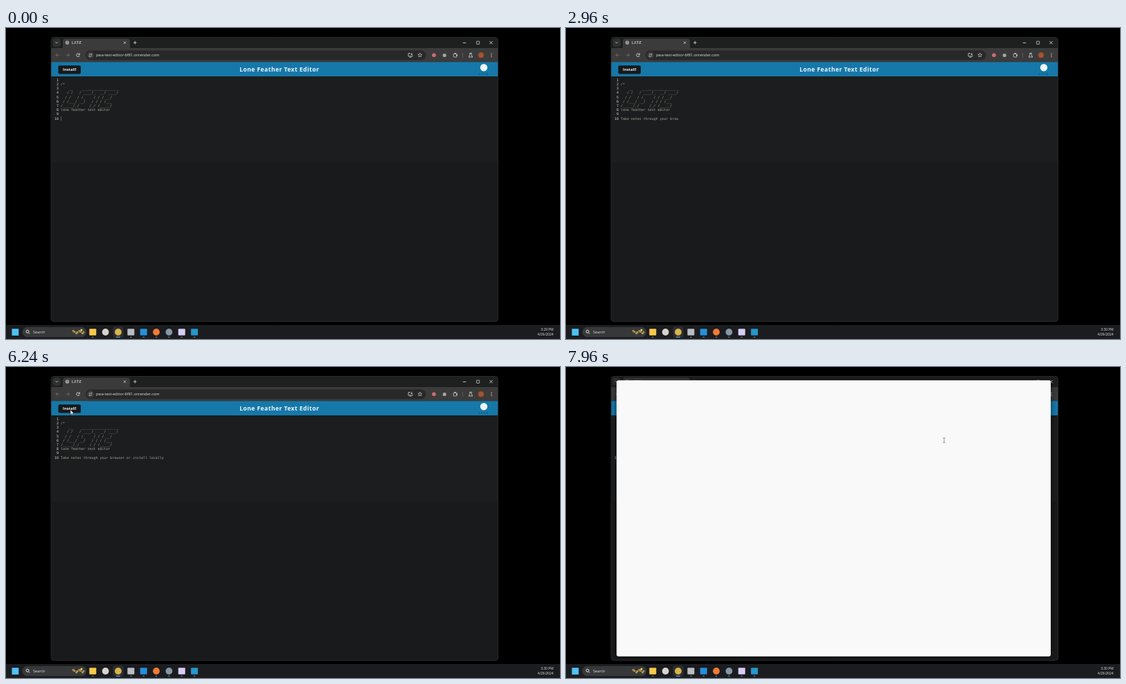
An HTML page with a canvas that plays this animation: 800 px wide and 450 px high, repeating every 8000 ms.

```html
<!DOCTYPE html>
<html lang="en">
<head>
<meta charset="utf-8">
<title>Lone Feather Text Editor</title>
<style>
html, body { margin: 0; width: 100%; height: 100%; overflow: hidden; background: #000; }
canvas { display: block; width: 800px; height: 450px; }
</style>
</head>
<body>
<canvas id="stage"></canvas>
<script>
const LOOP = 8000;
const UI = '"Open Sans", "Noto Sans", sans-serif';
const MONO = '"DejaVu Sans Mono", monospace';
const ROW = 6.22, COL = 2.98, CODE_X = 79, CODE_Y = 75;
const NOTE = 'Take notes through your browser or install locally';
const CODE = [
  '', '/*',
  '    __    __________________',
  '   / /   / ____/_  __/ ____/',
  '  / /   / /_    / / / __/',
  ' / /___/ __/   / / / /___',
  '/_____/_/     /_/ /_____/',
  'lone feather text editor', ''
];
const URL_TEXT = 'pwa-text-editor-6f81.onrender.com';
const POPUP = [6280, 7460], ICON_GONE = 7580, CLOCK_FLIP = 700, APP_OPEN = 7890;

const canvas = document.getElementById('stage');
const ctx = canvas.getContext('2d');
const dpr = window.devicePixelRatio || 1;
canvas.width = 800 * dpr;
canvas.height = 450 * dpr;

const clamp = v => Math.max(0, Math.min(1, v));
const ease = v => v * v * (3 - 2 * v);

function box(x, y, w, h, fill, r = 0, stroke) {
  ctx.beginPath();
  ctx.roundRect(x, y, w, h, r);
  if (fill) { ctx.fillStyle = fill; ctx.fill(); }
  if (stroke) { ctx.strokeStyle = stroke; ctx.lineWidth = 0.7; ctx.stroke(); }
}

function dot(x, y, r, fill, stroke, lw = 0.8) {
  ctx.beginPath();
  ctx.arc(x, y, r, 0, 7);
  if (fill) { ctx.fillStyle = fill; ctx.fill(); }
  if (stroke) { ctx.strokeStyle = stroke; ctx.lineWidth = lw; ctx.stroke(); }
}

function line(color, lw, ...p) {
  ctx.beginPath();
  ctx.moveTo(p[0], p[1]);
  for (let i = 2; i < p.length; i += 2) ctx.lineTo(p[i], p[i + 1]);
  ctx.strokeStyle = color;
  ctx.lineWidth = lw;
  ctx.stroke();
}

function text(s, x, y, size, color, { font = UI, weight = 400, align = 'left', gap = 0 } = {}) {
  ctx.font = `${weight} ${size}px ${font}`;
  ctx.letterSpacing = gap + 'px';
  ctx.textAlign = align;
  ctx.fillStyle = color;
  ctx.fillText(s, x, y + size * 0.35);
}

function cross(x, y, r, color) {
  line(color, 0.8, x - r, y - r, x + r, y + r);
  line(color, 0.8, x - r, y + r, x + r, y - r);
}

function tabStrip() {
  box(65, 13.5, 645.5, 411, '#191a1b', 4, '#363636');
  box(65.4, 14, 644.8, 20, '#1e1f1f', [4, 4, 0, 0]);
  box(67.5, 15.5, 11.5, 11.5, '#303131', 4);
  line('#dddddd', 0.8, 71.5, 20.3, 73.2, 22, 74.9, 20.3);
  box(82, 15.5, 97, 14, '#3b3b3b', [4, 4, 0, 0]);
  dot(88.5, 21.2, 2.4, '#777', '#c8c8c8', 0.7);
  line('#d0d0d0', 0.6, 86.8, 20.2, 88.8, 21.3, 88, 23);
  text('L.F.T.E', 95, 21.2, 4.9, '#eeeeee', { weight: 600 });
  cross(171.5, 21.2, 1.6, '#e0e0e0');
  line('#e0e0e0', 0.8, 184, 21.2, 188.6, 21.2);
  line('#e0e0e0', 0.8, 186.3, 18.9, 186.3, 23.5);
  line('#e8e8e8', 0.8, 659.8, 21.5, 664.2, 21.5);
  box(679.5, 19.2, 4.2, 4.2, null, 0.6, '#e8e8e8');
  cross(700.5, 21.2, 2.1, '#e8e8e8');
}

function arrow(x, y, dir, color) {
  line(color, 0.8, x - 2.5, y, x + 2.5, y);
  line(color, 0.8, x + dir * 0.3, y - 2.2, x + dir * 2.5, y, x + dir * 0.3, y + 2.2);
}

function star(x, y, r, color) {
  ctx.beginPath();
  for (let i = 0; i < 10; i++) {
    const a = i * Math.PI / 5 - Math.PI / 2, d = i % 2 ? r * 0.48 : r;
    ctx.lineTo(x + d * Math.cos(a), y + d * Math.sin(a));
  }
  ctx.closePath();
  ctx.strokeStyle = color;
  ctx.lineWidth = 0.7;
  ctx.stroke();
}

function toolBar(t) {
  const ink = '#d8d8d8';
  box(65.4, 29, 644.8, 20.5, '#3b3b3b');
  arrow(74.5, 39.2, -1, '#777777');
  arrow(89, 39.2, 1, '#777777');
  ctx.beginPath();
  ctx.arc(104, 39.2, 2.3, 0.3, 5.5);
  ctx.strokeStyle = ink;
  ctx.lineWidth = 0.9;
  ctx.stroke();
  line(ink, 0.9, 106.4, 36.6, 106.4, 38.6, 104.4, 38.6);

  box(115, 32.4, 491.5, 13.8, '#282828', 6.9);
  dot(122, 39.3, 5, '#3b3b3b');
  line(ink, 0.7, 119.8, 38, 122.2, 38);
  dot(123.4, 38, 0.8, null, ink, 0.6);
  line(ink, 0.7, 121.8, 40.8, 124.2, 40.8);
  dot(120.6, 40.8, 0.8, null, ink, 0.6);
  text(URL_TEXT, 130, 39.2, 5.58, '#e3e3e3');

  if (t < ICON_GONE) {
    if (t >= POPUP[0] && t < POPUP[1]) dot(584, 39.3, 5, '#5b5c5e');
    line(ink, 0.8, 584, 36.8, 581, 36.8, 581, 41, 587, 41, 587, 39.6);
    line(ink, 0.8, 582.6, 42.2, 585.4, 42.2);
    line(ink, 0.8, 585.8, 35.8, 585.8, 39);
    line(ink, 0.8, 584.5, 37.8, 585.8, 39.1, 587.1, 37.8);
  }
  star(597.7, 39.3, 3, ink);
  dot(618, 39.3, 2.8, '#c96f6a');
  dot(633.2, 39.5, 2.6, '#a5a5a5');
  box(646.2, 37.2, 4.8, 4.8, null, 0.7, ink);
  dot(648.5, 37, 1, ink);
  dot(651, 39.5, 1, ink);
  line('#666666', 0.7, 659.5, 36, 659.5, 42.5);
  line(ink, 0.8, 670, 36.3, 670, 38.6, 668.3, 42, 673.7, 42, 672, 38.6, 672, 36.3);
  line(ink, 0.8, 669.3, 36.4, 672.7, 36.4);
  dot(686, 39.3, 4, '#a5532d');
  for (let i = -1; i < 2; i++) dot(701, 39.3 + i * 2.1, 0.65, '#e3e3e3');
}

function page(t) {
  box(65.4, 49.3, 644.8, 20.7, '#1678a9');
  box(75.5, 54.3, 32.5, 12.2, '#15191c', 2);
  text('Install!', 91.8, 60.4, 5.7, '#f4f4f4', { weight: 700, align: 'center' });
  text('Lone Feather Text Editor', 394.7, 60, 8.6, '#f0f6fa',
    { weight: 700, align: 'center', gap: 0.43 });
  dot(690, 57.3, 5.2, '#eef5f9');
  text('LFTE', 690, 66.8, 4.2, '#0d4564', { align: 'center', gap: 1.4 });
  box(65.4, 70, 644.8, 125, '#1c1d1e');

  const opt = { font: MONO };
  for (let i = 0; i < 10; i++) {
    const y = CODE_Y + i * ROW;
    text(String(i + 1), 76, y, 4.95, '#dededa', { font: MONO, align: 'right' });
    if (CODE[i]) text(CODE[i], CODE_X, y, 4.95, '#aaa597', opt);
  }
  const n = typed(t), y = CODE_Y + 9 * ROW;
  text(NOTE.slice(0, n), CODE_X, y, 4.95, '#aaa597', opt);
  if (t < 5200 && (n === 0 || t % 1060 < 800)) {
    box(CODE_X + n * COL, y - 3, 0.5, 6, '#a0a0a0');
  }
}

function typed(t) {
  const n = t < 2110 ? (t - 380) / 91 + 1 : 20 + (t - 2110) / 101;
  return Math.max(0, Math.min(NOTE.length, Math.floor(n)));
}

function popup() {
  ctx.save();
  ctx.shadowColor = 'rgba(0,0,0,.5)';
  ctx.shadowBlur = 4 * dpr;
  box(474, 47, 133, 78.7, '#1f1f20', 4);
  ctx.restore();
  box(474, 47, 133, 78.7, null, 4, '#3c3d3e');
  text('Install app?', 482, 60, 6.1, '#eeeeee', { weight: 600 });
  cross(595.3, 59.6, 1.8, '#e3e3e3');
  dot(492, 80, 2.7, '#b8b8b8');
  text('Text Editor', 508.7, 75.8, 5, '#e3e3e3');
  text(URL_TEXT, 508.7, 84.2, 4.75, '#d0d0d0');
  box(536, 102, 29.6, 15.4, null, 7.7, '#1b718e');
  text('Install', 550.6, 109.7, 5.1, '#b9d2fa', { weight: 600, align: 'center' });
  box(569.2, 101.8, 29.8, 15.8, '#a8c7fa', 7.9);
  text('Cancel', 584, 109.7, 5.1, '#123465', { weight: 600, align: 'center' });
}

function taskBar(t) {
  box(0, 430, 800, 20, '#1b1c1f');
  box(0, 430, 800, 0.6, '#29292c');
  box(8.5, 435.2, 9.8, 9.8, '#4cc2f5');
  box(24, 433.3, 92, 13.4, '#37383a', 6.7, '#434446');
  dot(31, 439.2, 2, null, '#f0f0f0', 0.9);
  line('#f0f0f0', 0.9, 32.5, 440.7, 34.2, 442.5);
  text('Search', 39, 440, 5.5, '#dedede');
  ctx.fillStyle = '#c3a650';
  for (let i = 0; i < 4; i++) {
    const x = 98 + i * 4.4, y = 439 + (i % 2) * 2;
    ctx.beginPath();
    ctx.ellipse(x, y, 2.6, 1.5, i % 2 ? -0.7 : 0.6, 0, 7);
    ctx.fill();
    line('#5c4a25', 0.7, x - 1, y - 1, x + 1, y + 1.2);
  }
  dot(109, 437, 1.5, '#eadca0');

  const apps = [['#f7c948', 1], ['#d8d3cd', 0], ['#d9b44a', 0], ['#b9bcc0', 1], ['#2490dc', 1],
    ['#f47a32', 0], ['#8298a8', 0], ['#d9cdf5', 1], ['#2498ce', 1]];
  apps.forEach(([color, square], i) => {
    const x = 125.3 + i * 18.35;
    if (i === 2) box(x - 7.5, 432.2, 15, 15.5, '#2d2e31', 2);
    if (square) box(x - 5, 435.2, 10, 9.6, color, 1);
    else dot(x, 440, 4.9, color);
    if (i === 2) box(x - 3, 446.7, 6, 1.1, '#67c6ee', 0.5);
    else if (i !== 1) box(x - 1.3, 446.8, 2.6, 0.9, '#95989b', 0.4);
  });
  const right = { align: 'right' };
  text(t < CLOCK_FLIP ? '3:29 PM' : '3:30 PM', 790.5, 436.6, 4.85, '#e8e8e8', right);
  text('4/26/2024', 790.5, 443.4, 4.85, '#e8e8e8', right);
}

// Pointer stops: time, x, y
const PATH = [[5480, 236, 142], [6020, 93, 62], [6420, 93, 62], [6840, 440, 83],
  [7200, 546, 106], [8000, 546, 106]];

function pointerAt(t) {
  const i = PATH.findIndex(p => p[0] > t);
  if (i < 1) return null;
  const [t0, x0, y0] = PATH[i - 1], [t1, x1, y1] = PATH[i];
  const k = ease(clamp((t - t0) / (t1 - t0)));
  return [x0 + (x1 - x0) * k, y0 + (y1 - y0) * k];
}

function pointer(t) {
  const at = pointerAt(t);
  if (!at) return;
  const [x, y] = at;
  const overPopup = t >= POPUP[0] && t < POPUP[1] && x > 474;
  const overButton = x < 108 && y < 66.5;
  if (overPopup || overButton || y < 70) {
    ctx.beginPath();
    [[0, 0], [0, 7], [1.7, 5.4], [2.9, 8], [4, 7.5], [2.9, 5], [5, 5]]
      .forEach(([dx, dy]) => ctx.lineTo(x + dx, y + dy));
    ctx.closePath();
    ctx.fillStyle = '#fff';
    ctx.fill();
    ctx.strokeStyle = '#222';
    ctx.lineWidth = 0.5;
    ctx.stroke();
    return;
  }
  const ink = t > APP_OPEN + 30 ? '#82908d' : '#d6d9d8';
  line(ink, 0.9, x, y - 3.2, x, y + 3.2);
  line(ink, 0.9, x - 1.8, y - 3.2, x + 1.8, y - 3.2);
  line(ink, 0.9, x - 1.8, y + 3.2, x + 1.8, y + 3.2);
}

function appWindow(t) {
  const p = clamp((t - APP_OPEN) / 70);
  if (!p) return;
  const s = 0.96 + 0.04 * p;
  ctx.save();
  ctx.globalAlpha = p;
  ctx.translate(386.5, 219);
  ctx.scale(s, s);
  ctx.shadowColor = 'rgba(0,0,0,.6)';
  ctx.shadowBlur = 8 * dpr;
  box(-313.5, -199.7, 627, 399.4, '#f9f9f9', 3);
  ctx.restore();
}

function draw(t) {
  ctx.setTransform(dpr, 0, 0, dpr, 0, 0);
  ctx.fillStyle = '#000';
  ctx.fillRect(0, 0, 800, 450);
  tabStrip();
  toolBar(t);
  page(t);
  if (t >= POPUP[0] && t < POPUP[1]) popup();
  appWindow(t);
  taskBar(t);
  pointer(t);
}

const start = performance.now();
function tick() {
  draw((performance.now() - start) % LOOP);
  requestAnimationFrame(tick);
}
tick();
</script>
</body>
</html>
```
